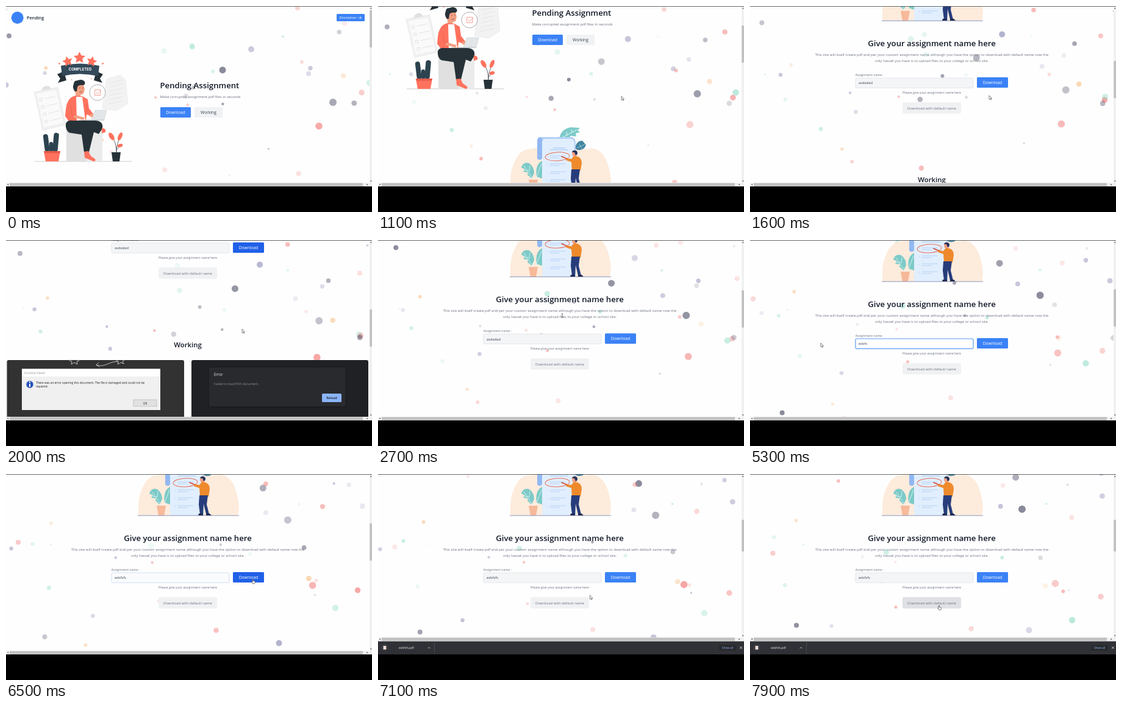
Recreate the animation shown at these times as an HTML page. Size 600 by 338 pixels, loop 8 s.

```html
<!DOCTYPE html>
<html lang="en">
<head>
<meta charset="utf-8">
<title>Pending Assignment</title>
<style>
html, body { margin: 0; width: 100%; height: 100%; overflow: hidden; background: #000; }
svg { display: block; width: 100%; height: 100%; }
text { font: 5.95px "Open Sans", "Noto Sans", sans-serif; fill: #6b7280; white-space: pre; }
.title { font-size: 13.2px; font-weight: 600; fill: #111827; }
.btn { font-size: 6.7px; fill: #fff; }
.small { font-size: 5.2px; }
.dialog { font-size: 4.76px; fill: #222; }
.mid { text-anchor: middle; }
.blue { fill: #3b82f6; }
.grey { fill: #f1f2f4; }
.coral { fill: #ff725e; }
.ink { fill: #263238; }
.skin { fill: #f3a083; }
.teal { fill: #7ccac8; }
.line { fill: none; stroke-linecap: round; stroke-linejoin: round; }
</style>
</head>
<body>
<svg viewBox="0 0 600 338">
<defs>
  <path id="star" d="M0-10 2.9-4 9.5-3.1 4.8 1.5 5.9 8.1 0 5-5.9 8.1-4.8 1.5-9.5-3.1-2.9-4Z"/>
</defs>
<rect width="600" height="338" fill="#fefefe"/>
<g id="dots"></g>

<g id="page">
  <!-- header and hero -->
  <circle class="blue" cx="18.7" cy="19.3" r="10"/>
  <text x="34" y="22.2" style="font-size:7.2px;font-weight:600;fill:#1f2937">Pending</text>
  <rect class="blue" x="542" y="13" width="46" height="12" rx="1.5"/>
  <text x="546.5" y="21.2" style="font-size:5.8px;fill:#fff">Disclaimer</text>
  <path class="line" d="M577.5 19.2h5m-2-2 2 2-2 2" stroke="#fff" stroke-width=".7"/>
  <text class="title" x="252.5" y="135">Pending Assignment</text>
  <text x="252.5" y="151">Make corrupted assignment pdf files in seconds</text>
  <rect class="blue" x="253" y="166" width="50" height="17" rx="1.5"/>
  <text class="btn mid" x="278" y="177">Download</text>
  <rect class="grey" x="309" y="166" width="46" height="17" rx="1.5"/>
  <text class="btn mid" x="332" y="177" style="fill:#374151">Working</text>

  <!-- seated man -->
  <path d="M47 255H207" stroke="#999" stroke-width=".5"/>
  <path d="M46 141 85 133 98 195 60 204Z" fill="#f0f0f0" stroke="#e6e6e6" stroke-width=".6"/>
  <path d="M50 144 82 138 94 192 62 199Z" fill="#fafafa"/>
  <path d="M58 139 60 134Q66 129 71 132L74 136Z" fill="#e0e0e0"/>
  <path id="tasks" class="line" stroke="#dcdcdc" stroke-width=".8"/>
  <path d="M165 120 187 113 196 121 200 160 181 172 158 168Z" fill="#f2f2f2" stroke="#e8e8e8" stroke-width=".6"/>
  <path id="lines" class="line" stroke="#e0e0e0" stroke-width=".7"/>
  <path class="ink" d="M84 112 95 107 99 122 85 126 89 119ZM159 112 148 107 144 122 158 126 154 119Z"/>
  <path d="M90 98Q121 91 153 98L151 115Q121 108 92 115Z" fill="#34495a"/>
  <g class="coral">
    <use href="#star" transform="translate(120.5 85)"/>
    <use href="#star" transform="translate(101 91) rotate(-14) scale(.88)"/>
    <use href="#star" transform="translate(140.5 91) rotate(14) scale(.88)"/>
    <path d="M87 93l2 1-1 2-2-1zM157 94l3-1 0 2-2 1zM107 120l2 1-2 1zM139 118l2 2-2 0z"/>
  </g>
  <text class="mid" x="121.5" y="106" style="font:700 6px Inter,sans-serif;fill:#fff">COMPLETED</text>
  <path d="M99 193 108 186H149L158 193V255H99Z" fill="#e0e0e0"/>
  <path d="M132 193h26v62h-26z" fill="#ebebeb"/>
  <circle cx="150" cy="142" r="13" fill="#fff" stroke="#777" stroke-width=".6"/>
  <path class="line" d="M146 137.5h9v9h-9zM148 142l2.2 2.5 5-5.5" stroke="#ef7b6a" stroke-width=".7"/>
  <path class="skin" d="M114 128h13l2 9-2 7-5 2 1 6-8 0-1-10-3-4z"/>
  <path class="ink" d="M113 140Q108 134 111 128 111 122 118 122 125 119 129 124 131 129 126 130 119 129 117 133L116 140Z"/>
  <path class="line" d="M121 134v1M126 134v1M121 141q3 1 4-1" stroke="#333" stroke-width=".6"/>
  <path class="coral" d="M114 147Q100 150 98 170L97 181 103 189H131L132 178 140 181 143 177 136 168 134 153 125 148Z"/>
  <path d="M115 149 125 149 130 187 116 188Z" fill="#fff"/>
  <path class="line" d="M106 164 108 178 120 181M132 166l1 9" stroke="#d65545" stroke-width=".5"/>
  <path class="skin" d="M112 179l17 4-2 4-16-4zM138 177l7 1-1 5-6-1z"/>
  <path class="ink" d="M98 193Q100 187 110 188H147Q160 189 158 201L152 210 144 207 136 240H128L124 211 104 208Q97 204 98 193Z"/>
  <path class="coral" d="M157 200Q165 201 163 207L157 209ZM128 239 135 238 139 246 146 251Q148 254 144 255L129 249Z"/>
  <path d="M146 171H165L161 187H140Z" fill="#e3e6e8" stroke="#c3c9cd" stroke-width=".5"/>
  <path d="M120 187.3h41" stroke="#b4bbc0" stroke-width=".8"/>
  <g fill="#2c434f">
    <rect x="76" y="208" width="8.5" height="31" rx="4" transform="rotate(5 80 239)"/>
    <rect x="64" y="210" width="8" height="29" rx="4" transform="rotate(-7 68 239)"/>
    <rect x="71" y="223" width="6" height="16" rx="3"/>
  </g>
  <path class="ink" d="M173 240h15l-2 15h-11z"/>
  <path class="coral" d="M62 238H89L86 255H65Z"/>
  <path d="M62 238h27l-1 3.5H63z" fill="#e25c4a"/>
  <path class="line" d="M181 240Q181 225 174 214M181 239Q181 226 187 216M182 235l5-6" stroke="#263238" stroke-width=".7"/>
  <g class="coral">
    <ellipse cx="173" cy="214" rx="3.6" ry="7" transform="rotate(-32 173 214)"/>
    <ellipse cx="187" cy="214" rx="3.2" ry="7" transform="rotate(24 187 214)"/>
    <ellipse cx="187" cy="229" rx="4.5" ry="2.8" transform="rotate(-15 187 229)"/>
  </g>

  <!-- man with the long list -->
  <g transform="translate(0 119)">
    <path d="M217 301Q216 272 222 260 230 238 245 235 260 234 272 228 300 216 318 230 338 238 350 233 372 236 379 268 384 289 380 301Z" fill="#fdebdc"/>
    <path class="teal" d="M297 219Q299 202 316 199L331 200 327 204 331 207 324 209 325 214 316 213 310 219Z"/>
    <path class="line" d="M302 216l24-13M309 207l1 5M317 203l1 4" stroke="#e9fbfa"/>
    <path d="M323 234Q325 221 335 221L341 228Q337 238 327 236Z" fill="#4384a2"/>
    <path class="line" d="M326 233l13-6M330 227l4 7" stroke="#a5dbe2" stroke-width=".8"/>
    <path d="M261 251V223Q261 215 269 215H318Q324 217 324 225V301H269V251Z" fill="#b4d0f7"/>
    <path d="M269 224Q269 218 275 218H318Q322 220 322 226V301H269Z" fill="#e1eefd"/>
    <path d="M261 223Q261 215 266 215 270 216 269 224V250Q265 255 261 250Z" fill="#92b8f2"/>
    <path class="line" d="M288 233h18M282 236h29" stroke="#9cc0f4" stroke-width=".9"/>
    <path id="list" class="line" stroke="#b6d2f8"/>
    <ellipse cx="294" cy="247" rx="20" ry="7" fill="none" stroke="#e5705a" transform="rotate(-3 294 247)"/>
    <path class="line" d="M301 247l10 4" stroke="#d34734" stroke-width="1.6"/>
    <path class="skin" d="M318 242Q318 236 324 237 328 239 326 245L323 247 319 246Z"/>
    <path d="M318 240Q320 235 326 238 329 243 324 245L322 240Z" fill="#25345f"/>
    <path d="M309 250l8 1 4-5Q334 246 334 258L332 270H318L317 256 308 253Z" fill="#ee8a2c"/>
    <path d="M317 268H331L329 283 333 299H328L324 282 323 299H318L316 283Z" fill="#273d7b"/>
    <path d="M316 298h7v3h-8zM328 298h6l3 3h-9z" fill="#1c2449"/>
    <path class="teal" d="M252 283 245 277 246 273 238 272 241 268 235 265Q238 255 248 258 256 264 256 274ZM260 280Q257 260 269 254V283Z"/>
    <path class="line" d="M239 262l15 22M268 259l-9 24M241 270l6 0M249 262l-1 9" stroke="#e0f8f6" stroke-width=".8"/>
    <path d="M247 285h15l-3 16h-9z" fill="#f6b99a"/>
    <path d="M216 301.2H382" stroke="#7f8db5" stroke-width=".9"/>
  </g>

  <!-- form -->
  <g transform="translate(0 352)">
    <text class="title mid" x="298" y="109.8">Give your assignment name here</text>
    <text class="mid" x="298" y="126">This site will itself create pdf and per your custom assignment name although you have the option to download with default name now the</text>
    <text class="mid" x="298" y="136">only hassel you have is to upload files to your college or school site.</text>
    <text class="small" x="172.7" y="159">Assignment name :</text>
    <rect id="field" x="173" y="162" width="193" height="16.3" rx="1.5"/>
    <rect id="mark" y="164" height="12.5" fill="#2f7de1"/>
    <text id="value" x="178" y="172.4" style="font-size:5.8px"></text>
    <rect id="get" x="372" y="161" width="51" height="17" rx="1.5"/>
    <text class="btn mid" x="397.5" y="172.2">Download</text>
    <text class="small mid" x="298" y="187.8">Please give your assignment name here</text>
    <rect id="plain" x="250" y="202" width="96" height="18.5" rx="3"/>
    <text class="mid" x="298" y="213.5">Download with default name</text>
  </g>

  <!-- error cards -->
  <g transform="translate(0 509)">
    <text class="title mid" x="298" y="176" style="font-size:11.4px">Working</text>
    <rect x="1.5" y="197" width="290.5" height="170" rx="3" fill="#323232"/>
    <path class="line" d="M104 198l4 1-1 5 5-3 5 3-1-5 4-1M148 205q9 3 17-1t18-5M148 205l4-4M148 205l5 3M181 198l3 1-1 5 5-3 5 2-2-4 3-2" stroke="#ccc" stroke-width=".9"/>
    <path d="M26 211.5H253V279H26Z" fill="#f0f0f0"/>
    <path d="M26 211.5H253V224H26Z" fill="#fff"/>
    <text class="dialog" x="29.5" y="219.8" style="fill:#999">Gondola Viewer</text>
    <circle cx="39" cy="237" r="6" fill="#2752bd" stroke="#b9c4dd"/>
    <path d="M38 236h2v5h-2zM38 232.5h2v2h-2z" fill="#fff"/>
    <text class="dialog" x="49" y="235.5">There was an error opening this document. The file is damaged and could not be</text>
    <text class="dialog" x="49" y="242.3">repaired.</text>
    <rect x="209" y="262" width="38" height="11" fill="#e1e1e1" stroke="#adadad" stroke-width=".6"/>
    <text class="dialog mid" x="228" y="269.5">OK</text>
    <rect x="304" y="197" width="290" height="170" rx="3" fill="#202124"/>
    <rect x="331" y="208" width="227" height="67" rx="3" fill="#1a1b1e"/>
    <rect x="332.5" y="209" width="224" height="64" rx="2" fill="#292a2d"/>
    <text x="341" y="222.5" style="font-size:6.2px;fill:#e8eaed">Error</text>
    <text x="341" y="238" style="font-size:5.4px;fill:#8d9095">Failed to load PDF document.</text>
    <rect x="518" y="252" width="32" height="14" rx="1.5" fill="#8ab4f8"/>
    <text class="mid" x="534" y="261" style="font-size:5.3px;font-weight:600;fill:#202124">Reload</text>
  </g>
</g>

<!-- browser frame -->
<rect x="596" width="4" height="297" fill="#f1f1f1"/>
<rect id="thumb" x="596.3" width="3.7" fill="#c1c1c1"/>
<path d="M596.8 4.5 598.2 2.5 599.6 4.5Z" fill="#555"/>
<g id="foot">
  <rect y="290" width="600" height="6" fill="#f1f1f1"/>
  <rect x="6" y="290.5" width="579" height="5.2" fill="#c1c1c1"/>
  <path d="M4 291.5v3l-2-1.5zM591.5 291.5v3l2-1.5zM596.8 286.5h2.8l-1.4 2z" fill="#555"/>
  <rect y="296.5" width="600" height="23" fill="#303136"/>
  <path d="M92.5 298v19" stroke="#55575c" stroke-width=".7"/>
  <circle cx="11" cy="307" r="5" fill="none" stroke="#4a4c50" stroke-width=".8"/>
  <rect x="8.7" y="304" width="4.8" height="6" fill="#f0dcda"/>
  <text x="34" y="309" style="font-size:4.9px;fill:#e8eaed">edsfsfs.pdf</text>
  <path class="line" d="M82 308l1.7-1.8 1.7 1.8M593.2 305.2l3.6 3.6m0-3.6-3.6 3.6" stroke="#d0d2d6" stroke-width=".8"/>
  <rect x="558" y="301.5" width="30" height="11.5" rx="1.5" fill="#292a2d" stroke="#45474c" stroke-width=".4"/>
  <text class="mid" x="573" y="309" style="font-size:4.7px;fill:#8ab4f8">Show all</text>
</g>
<rect y="296" width="600" height="42"/>
<rect width="600" height="1" fill="#666"/>
<path id="cursor" stroke-width=".6"/>
</svg>

<script>
const $ = id => document.getElementById(id);
const set = (el, attrs) => { for (const k in attrs) el.setAttribute(k, attrs[k]); };
const repeat = (n, fn) => Array.from({ length: n }, (_, i) => fn(i));
const within = (t, a, b) => t >= a && t < b;
const wrap = (v, size) => ((v + 8) % size + size) % size - 8;
const smooth = p => p * p * (3 - 2 * p);

// Ruled lines on the papers
set($('tasks'), { d: repeat(4, i => `M${55 + 3 * i} ${152 + 12 * i}l4-1 1 4-4 1zm9 0l17-4`).join('') });
set($('lines'), { d: repeat(6, i => `M${172 - i} ${126 + 7 * i}l${18 + i}-5`).join('') });
set($('list'), { d: repeat(4, i => `M277 ${247 + 13 * i}h1M282 ${246 + 13 * i}h25m-25 3h15`).join('') });

let seed = 11;
const random = () => (seed = seed * 16807 % 2147483647) / 2147483647;
const [DARK, LILAC, PINK, GREEN, ORANGE] = ['#30324e', '#7b79ab', '#f0625f', '#83d9c0', '#f5a656'];

// The large dots by position, speed per second and radius; the rest are scattered
const dots = [
  [536, 158, -11.4, -12.7, 6, DARK], [355, 105, 10.2, -12.6, 5.5, DARK],
  [402, 71, 7, -15.3, 5, LILAC], [307, 134, 5.3, -12, 3, DARK],
  [5, 49, 9, -13.5, 4, DARK], [513, 197, -1.6, -2.2, 5.8, PINK],
  [583, 142, -1, 7.5, 4.7, PINK], [596, 126, -8.6, 14.4, 5.2, GREEN],
  ...repeat(32, i => [
    600 * random(), 290 * random(), 26 * (random() - .5), 26 * (random() - .5),
    1 + 4 * random(), [LILAC, PINK, GREEN, LILAC, DARK, PINK, GREEN, ORANGE][i % 8]])
].map(([x, y, vx, vy, r, fill], i) => {
  const el = document.createElementNS('http://www.w3.org/2000/svg', 'circle');
  set(el, { r, fill });
  $('dots').append(el);
  const base = i < 8 ? .42 : .28;
  return s => set(el, {
    cx: wrap(x + vx * s, 616), cy: wrap(y + vy * s, 306),
    opacity: base + .15 * Math.sin(2.6 * s + 1.7 * i)
  });
});

// Eased moves between rows of [time, values...]
function track(rows, t) {
  let i = 0;
  while (i < rows.length - 2 && t >= rows[i + 1][0]) i++;
  const [a, b] = [rows[i], rows[i + 1]];
  const p = smooth(Math.min(1, Math.max(0, (t - a[0]) / (b[0] - a[0]))));
  return a.slice(1).map((v, k) => v + (b[k + 1] - v) * p);
}

const scrolling = [[688, 0], [2000, 509], [2250, 509], [2770, 352]];
const pointer = [[600, 309, 132], [1100, 399, 150], [2000, 387, 148], [2700, 302, 124], [3300, 204, 171],
  [3800, 116, 171], [5500, 116, 171], [6300, 405, 175], [6700, 405, 175], [7400, 310, 218]];
const shapes = {
  arrow: ['M0-2V4.5L1.5 3.1 2.6 5.3 3.6 4.8 2.6 2.7H4.5Z', '#fff', '#333'],
  text: ['M-1.3-3H1.3M0-3V3M-1.3 3H1.3', 'none', '#222'],
  hand: ['M-.8-2Q0-3 .6-2V.3L3 .9Q3.6 1.2 3.3 3L2.6 5H-.5L-2.4 2Q-2 1-.8 2Z', '#fff', '#222']
};

function draw(t) {
  dots.forEach(move => move(t / 1000));

  const [scroll] = track(scrolling, t);
  const [lift] = track([[6800, 0], [7100, 22]], t);
  const view = 290 - lift, ratio = (view - 12) / 1322;
  set($('page'), { transform: `translate(0 ${-scroll})` });
  set($('foot'), { transform: `translate(0 ${-lift})` });
  set($('thumb'), { y: 7 + scroll * ratio, height: view * ratio });

  const overGet = within(t, 6150, 6800), overPlain = t >= 7300;
  const overText = t < 700 || within(t, 2500, 3700);
  const [x, y] = track(pointer, t);
  const [d, fill, stroke] = shapes[overGet || overPlain ? 'hand' : overText ? 'text' : 'arrow'];
  set($('cursor'), { d, fill, stroke, transform: `translate(${x} ${y})` });
  set($('get'), { fill: overGet || within(t, 1800, 2200) ? '#2060e8' : '#3b82f6' });
  set($('plain'), { fill: overPlain ? '#dfe0e5' : '#f0f1f3' });

  const focus = within(t, 3300, 6400), leaving = within(t, 6400, 6600);
  set($('field'), {
    fill: focus ? '#fff' : leaving ? '#fafbfd' : '#f4f5f7',
    stroke: focus ? '#5a9cf2' : leaving ? '#bcd3f5' : '#dcdfe4',
    'stroke-width': focus ? 1.2 : .7
  });

  // Drag from the right selects the old name, then typing replaces it
  const typed = Math.floor((t - 4600) / 130);
  const left = Math.max(177.5, x);
  const marked = within(t, 3300, 4700);
  set($('mark'), { x: left, width: marked ? Math.max(0, 201.5 - left) : 0 });
  $('value').textContent = typed > 0 ? 'edsfsfs'.slice(0, typed) : 'asdadad';
  $('value').style.fill = marked && left < 180 ? '#fff' : '#374151';
}

const start = performance.now();
function tick() {
  const t = (performance.now() - start) % 8000;
  draw(Math.floor(t / 100) * 100);
  requestAnimationFrame(tick);
}
tick();
</script>
</body>
</html>
```
